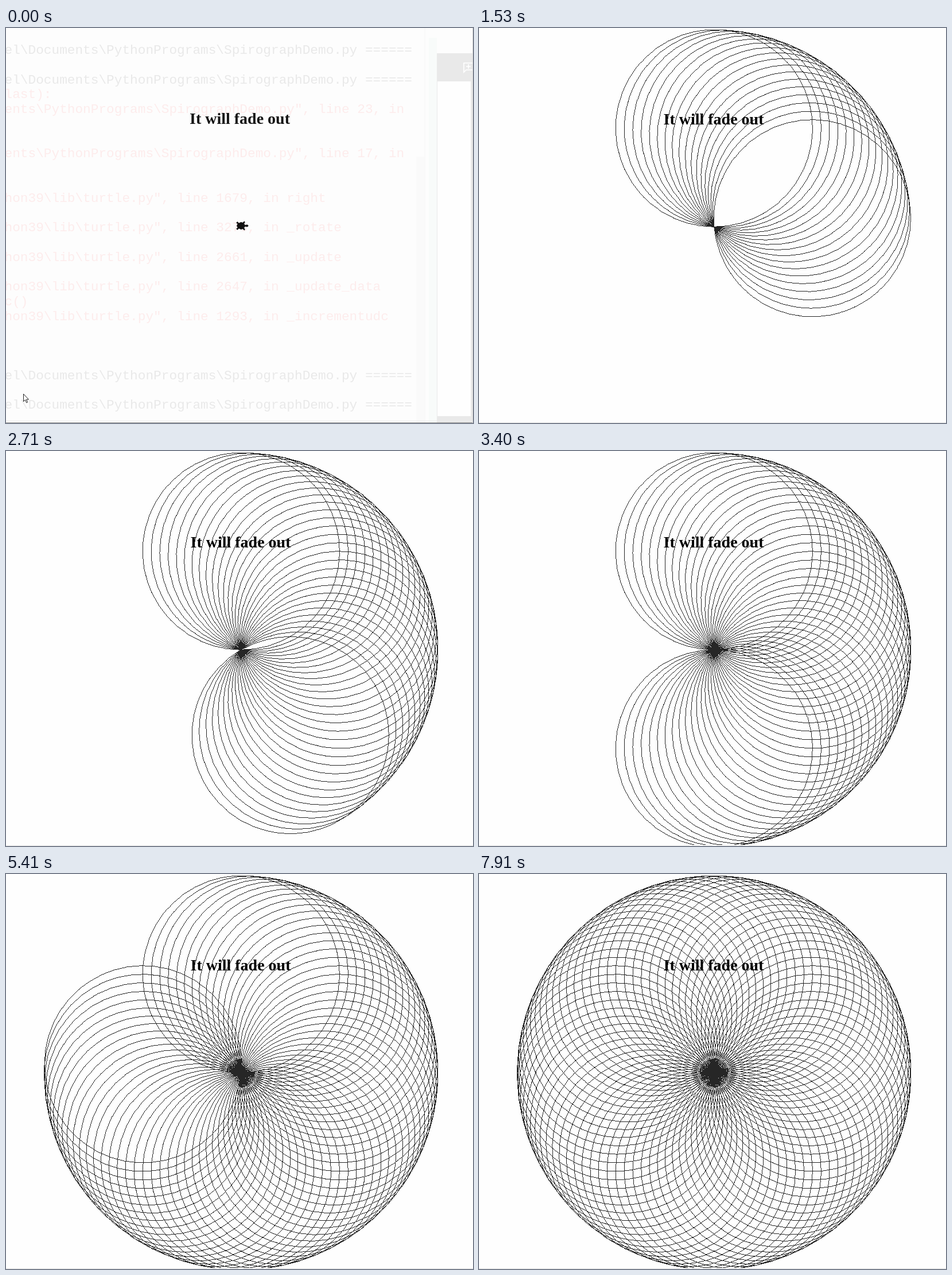
Write an HTML page with a canvas that moves like this. It is 814 px wide and 688 px high and loops after 8 s.

```html
<!DOCTYPE html>
<html lang="en">
<head>
<meta charset="utf-8">
<title>Spirograph</title>
<style>
  html, body { margin: 0; width: 814px; height: 688px; overflow: hidden; background: #fefefe; }
  canvas, svg { position: absolute; left: 0; top: 0; }
  #log { font: 22.78px "Liberation Mono", monospace; }
  #title { font: bold 28px "Liberation Serif", serif; text-anchor: middle; }
</style>
</head>
<body>
<canvas id="art" width="814" height="688"></canvas>
<svg width="814" height="688">
  <g id="intro">
    <rect width="814" height="688" fill="#fdfdfd"/>
    <g id="log"></g>
    <path d="M715 224h14v464h-14z" fill="#fafafa"/>
    <path d="M729 0h2v688h-2z" fill="#f9f9f9"/>
    <path d="M737 17h14v671h-14z" fill="#f8fbfa"/>
    <path d="M751 44h63v644h-63z" fill="#e9e9e9"/>
    <path d="M752 93h58v583h-58z" fill="#fefefe"/>
    <path d="M798 61h16v12h-12l-4 4zM806 63v8M802 67h8" fill="none" stroke="#fff" stroke-width="1.6"/>
    <path d="M0 684.5h814" stroke="#ececec"/>
    <path d="M0 687.5h814" stroke="#8c8c8c"/>
    <path d="M813.5 0v688" stroke="#d8d8d8"/>
    <polygon id="turtle" fill="#111" stroke="#111" transform="translate(408.5 344.5) scale(.86)"/>
    <path d="M30.5 637.5v13l3-2.8 2.2 5 2-.9-2.2-4.8h4z" fill="#fff" stroke="#222"/>
  </g>
  <path id="edge" d="M0 687.5h814" stroke="#e2e2e2"/>
  <text id="title">It will fade out</text>
</svg>
<script>
const $ = id => document.getElementById(id);
const ctx = $('art').getContext('2d');
const LOOP = 8000, R = 171.7, X0 = 409.3, Y0 = 345.8, SIDES = 45;

// [first ms, last ms, circles added at even spacing]
const bursts = [
  [50, 1060, 13], [1130, 1530, 5], [1610, 2150, 7], [2240, 2710, 6],
  [2870, 3250, 5], [3330, 4170, 9], [4250, 4330, 2], [4480, 5410, 9],
  [5490, 5490, 1], [5640, 6660, 8], [6830, 7830, 8], [7910, 7910, 1]
];
const times = bursts.flatMap(([a, b, n]) =>
  Array.from({ length: n }, (_, i) => a + (b - a) * i / Math.max(1, n - 1)));

// Faded console behind the first moment: [row, text, is error]
const script = 'PythonPrograms\\SpirographDemo.py';
const run = 'el\\Documents\\' + script + ' ======';
const trace = (line, name) => `hon39\\lib\\turtle.py", line ${line}, in ${name}`;
const rows = [
  [0, run], [2, run], [3, 'last):', 1],
  [4, `ents\\${script}", line 23, in`, 1], [7, `ents\\${script}", line 17, in`, 1],
  [10, trace(1679, 'right'), 1], [12, trace(3278, '_rotate'), 1],
  [14, trace(2661, '_update'), 1], [16, trace(2647, '_update_data'), 1],
  [17, 'c()', 1], [18, trace(1293, '_incrementudc'), 1], [22, run], [24, run]
];
for (const [row, text, error] of rows) {
  const t = document.createElementNS('http://www.w3.org/2000/svg', 'text');
  t.setAttribute('x', -2.5);
  t.setAttribute('y', 45 + row * 25.75);
  t.setAttribute('fill', error ? '#fdecec' : '#e9e9e9');
  t.textContent = text;
  $('log').append(t);
}

// Right-facing turtle: one half, mirrored
const half = [[16, 0], [14, 2], [10, 1], [7, 4], [9, 7], [8, 9], [5, 6], [1, 7],
  [-3, 5], [-6, 8], [-8, 6], [-5, 4], [-7, 0]];
const mirror = half.slice(1, -1).reverse().map(([x, y]) => [x, -y]);
$('turtle').setAttribute('points', half.concat(mirror).join(' '));

// Hard-edged one-pixel line
function line(x, y, x2, y2) {
  const n = Math.ceil(Math.max(Math.abs(x2 - x), Math.abs(y2 - y)));
  for (let i = 0; i <= n; i++)
    ctx.fillRect(Math.round(x + (x2 - x) * i / n), Math.round(y + (y2 - y) * i / n), 1, 1);
}

// A polygon with one corner on the hub, turned 5 degrees per step
function circle(k) {
  const a = (k * 5 - 90) * Math.PI / 180;
  const point = i => {
    const b = a + Math.PI + i * 2 * Math.PI / SIDES;
    return [X0 + R * (Math.cos(a) + Math.cos(b)), Y0 + R * (Math.sin(a) + Math.sin(b))];
  };
  for (let i = 0; i < SIDES; i++) line(...point(i), ...point(i + 1));
}

ctx.beginPath();
ctx.rect(0, 0, 814, 686);
ctx.clip();
ctx.fillStyle = '#262626';

let drawn = 0;
function render(now) {
  const t = now % LOOP;
  const count = times.filter(s => s <= t + .01).length;
  if (count < drawn) {
    ctx.clearRect(0, 0, 814, 688);
    drawn = 0;
  }
  while (drawn < count) circle(drawn++);

  const start = count === 0;
  $('intro').style.display = start ? '' : 'none';
  $('edge').style.display = start ? 'none' : '';
  $('title').setAttribute('x', start ? 407.5 : 409);
  $('title').setAttribute('y', start ? 167 : 168);
  $('title').setAttribute('fill', start ? '#151515' : '#000');
}

const begin = performance.now();
function tick() {
  render(performance.now() - begin);
  requestAnimationFrame(tick);
}
tick();
</script>
</body>
</html>
```
